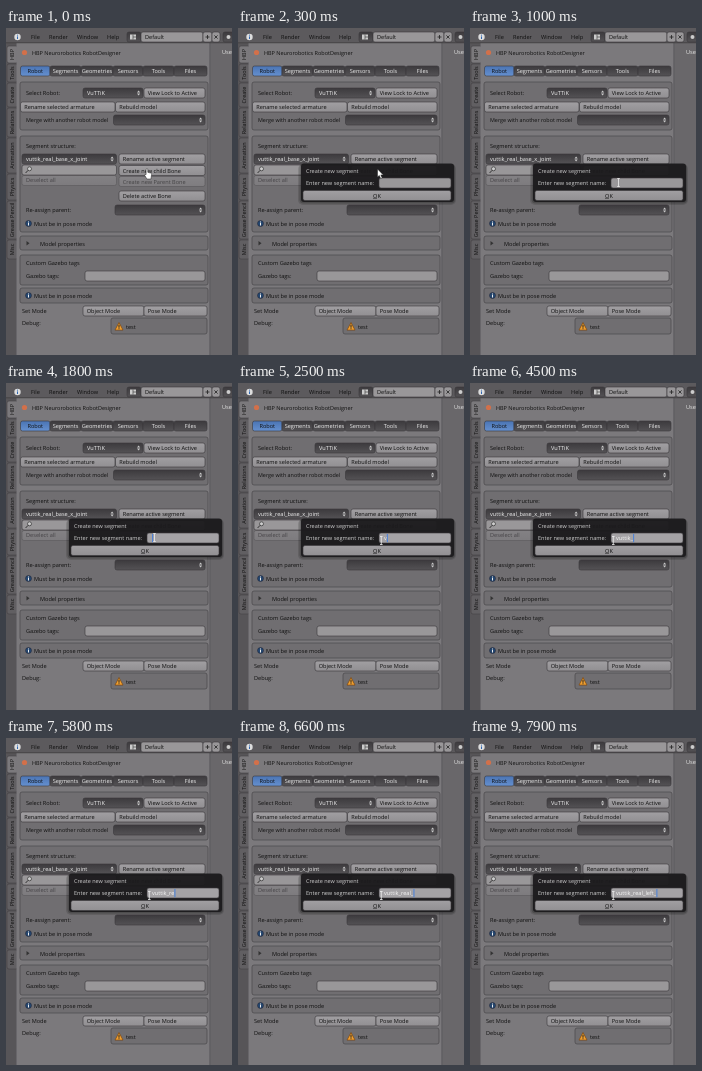
Recreate the animation shown at these times as an HTML page. Size 226 px wide and 327 px high, loop 8 s.

```html
<!DOCTYPE html>
<html lang="en">
<head>
<meta charset="utf-8">
<title>Segment naming</title>
<style>
  html, body { margin: 0; width: 100%; height: 100%; overflow: hidden; background: #7b797c; }
  svg { display: block; width: 100%; height: 100%; }
  text { font-family: "Open Sans", "Noto Sans", sans-serif; text-rendering: geometricPrecision; white-space: pre; }
</style>
</head>
<body>
<svg id="stage" viewBox="0 0 226 327">
  <defs>
    <linearGradient id="button" x2="0" y2="1"><stop stop-color="#a19fa2"/><stop offset="1" stop-color="#918f92"/></linearGradient>
    <linearGradient id="menu" x2="0" y2="1"><stop stop-color="#3c3a3d"/><stop offset="1" stop-color="#545255"/></linearGradient>
    <linearGradient id="active" x2="0" y2="1"><stop stop-color="#4a74b4"/><stop offset="1" stop-color="#6590cf"/></linearGradient>
  </defs>
</svg>
<script>
const LOOP = 8000;
const SIZE = 5.6;
const PANEL = '#7b797c';
const FIELD = '#999799';
const stage = document.getElementById('stage');

function add(tag, attrs, parent = stage) {
  const node = document.createElementNS('http://www.w3.org/2000/svg', tag);
  for (const key in attrs) node.setAttribute(key, attrs[key]);
  return parent.appendChild(node);
}

function rect(x, y, right, bottom, fill, extra, parent) {
  return add('rect', { x, y, width: right - x, height: bottom - y, fill, ...extra }, parent);
}

// y is the vertical middle of the line
function label(text, x, y, extra, parent) {
  const node = add('text', { x, y: y + 2.1, 'font-size': SIZE, fill: '#101010', ...extra }, parent);
  node.textContent = text;
  return node;
}

function widget(x, y, right, fill, extra, parent) {
  return rect(x, y, right, y + 10, fill, { rx: 2, stroke: '#3a383b', 'stroke-width': .6, ...extra }, parent);
}

function button(text, x, y, right, extra) {
  const g = add('g', extra);
  widget(x, y, right, 'url(#button)', {}, g);
  label(text, x + 3.7, y + 5, {}, g);
}

function menu(text, x, y, right) {
  widget(x, y, right, 'url(#menu)');
  label(text, x + 4, y + 5, { fill: '#eee' });
  add('path', { d: `M${right - 6} ${y + 4.4}l1.6-2 1.6 2zm0 1.2l1.6 2 1.6-2z`, fill: '#ccc' });
}

function box(x, y, right, bottom) {
  rect(x, y, right, bottom, '#706e71', { rx: 2, stroke: '#4a484b', 'stroke-width': .7 });
}

function notice(y) {
  add('circle', { cx: 22.5, cy: y, r: 3, fill: '#24466f', stroke: '#223', 'stroke-width': .5 });
  rect(22, y - .5, 23, y + 2, '#eee');
  rect(22, y - 2, 23, y - 1, '#eee');
  label('Must be in pose mode', 28, y);
}

function drawHeader() {
  rect(0, 0, 226, 15, '#5c5a5d');
  rect(0, 14.5, 226, 15.2, '#3a383b');
  add('circle', { cx: 11.5, cy: 9, r: 3.2, fill: '#ddd' });
  rect(11, 8.4, 12, 11, '#2f66b0');
  rect(11, 6.7, 12, 7.6, '#2f66b0');
  [['File', 25], ['Render', 43], ['Window', 71], ['Help', 101]].forEach(([text, x]) => label(text, x, 9));
  widget(121, 4, 135, 'url(#menu)');
  rect(124, 6.5, 130, 11.5, '#ccc');
  add('path', { d: 'M127 6.5v5M127 9h3', stroke: '#444', 'stroke-width': .7 });
  widget(135, 4, 197, FIELD);
  label('Default', 139, 9);
  widget(197, 4, 206, FIELD);
  widget(206, 4, 214, FIELD);
  add('path', { d: 'M199.5 9h4M201.5 7v4M208.4 7.4l3.2 3.2M211.6 7.4l-3.2 3.2', stroke: '#222', 'stroke-width': .8 });
  widget(217, 4, 230, 'url(#menu)');
  add('circle', { cx: 222.5, cy: 9, r: 2, fill: '#ccc' });
}

function drawSideTabs() {
  rect(0, 15, 11, 327, '#575558');
  [['HBP', 18, 35], ['Tools', 36, 54], ['Create', 55, 79], ['Relations', 80, 109], ['Animation', 110, 145],
   ['Physics', 146, 172], ['Grease Pencil', 173, 211], ['Misc', 212, 231]].forEach(([text, top, bottom], i) => {
    rect(1, top, 12, bottom, i ? '#615f62' : PANEL, { rx: 2, stroke: '#434144', 'stroke-width': .6 });
    const middle = (top + bottom) / 2;
    label(text, 5.5, middle, { 'text-anchor': 'middle', 'font-size': 5.5, transform: `rotate(-90 5.5 ${middle})` });
  });
  rect(10.5, 15, 13, 327, PANEL);
}

function drawPanel() {
  add('circle', { cx: 18.5, cy: 24.5, r: 2.6, fill: '#d2704a' });
  label('HBP Neurorobotics RobotDesigner', 26, 24.5, { 'font-size': 5.5 });

  const edges = [14.5, 44, 75, 107, 137, 168, 201];
  ['Robot', 'Segments', 'Geometries', 'Sensors', 'Tools', 'Files'].forEach((text, i) => {
    const [x, right] = [edges[i], edges[i + 1]];
    widget(x, 38, right, i ? 'url(#menu)' : 'url(#active)');
    label(text, (x + right) / 2, 43, { 'text-anchor': 'middle', fill: i ? '#eee' : '#101010' });
  });

  box(14, 54, 202, 102);
  label('Select Robot:', 20, 65);
  menu('VuTTiK', 77, 60, 137);
  button('View Lock to Active', 138, 60, 199);
  button('Rename selected armature', 14.5, 74, 109);
  button('Rebuild model', 109.5, 74, 199);
  label('Merge with another robot model', 20, 92, { 'font-size': 5.4 });
  menu('', 107.5, 87, 199);

  box(14, 108, 202, 204);
  label('Segment structure:', 20, 118);
  menu('vuttik_real_base_x_joint', 16, 126, 110.5);
  widget(16, 137, 110.5, FIELD);
  add('circle', { cx: 23.5, cy: 140.8, r: 2, fill: '#ccc', stroke: '#333', 'stroke-width': .7 });
  add('path', { d: 'M22 142.4l-2.4 2.6', stroke: '#333', 'stroke-width': 1 });
  button('', 16, 147.5, 110.5, { opacity: .4 });
  label('Deselect all', 20, 152, { fill: '#464447' });
  button('Rename active segment', 113, 126, 199);
  button('Create new child Bone', 113, 137.5, 199);
  button('Create new Parent Bone', 113, 148.5, 199, { opacity: .45 });
  button('Delete active Bone', 113, 163, 199);
  label('Re-assign parent:', 20, 182);
  menu('', 109, 177, 199);
  notice(195.5);

  box(14, 208, 202, 222);
  add('path', { d: 'M20.5 213l3 2.2-3 2.2z', fill: '#333' });
  label('Model properties', 34, 215.5);

  box(14, 227, 202, 257);
  label('Custom Gazebo tags', 20, 235);
  label('Gazebo tags:', 20, 248);
  widget(79, 243, 199, FIELD);

  box(14, 260, 202, 275);
  notice(267.5);

  label('Set Mode', 16, 283);
  button('Object Mode', 77, 278, 138);
  button('Pose Mode', 138, 278, 201);
  label('Debug:', 16, 295);
  box(105, 290, 201, 306);
  add('path', { d: 'M113 294.5l4 7.6h-8z', fill: '#f0a030', stroke: '#7a4510', 'stroke-width': .7, 'stroke-linejoin': 'round' });
  rect(112.5, 296.8, 113.5, 299.7, '#222');
  rect(112.5, 300.3, 113.5, 301.2, '#222');
  label('test', 120, 298.5);
}

function drawDialog() {
  const g = add('g');
  rect(60, 136, 218, 177, '#000', { rx: 5, opacity: .13 }, g);
  rect(61.5, 136, 217, 175.5, '#000', { rx: 4, opacity: .2 }, g);
  rect(63, 135.5, 216, 174, '#1b1a1c', { rx: 3, opacity: .93 }, g);
  label('Create new segment', 68, 143, { fill: '#ccc', 'font-size': 5.5 }, g);
  label('Enter new segment name:', 68, 155, { fill: '#ccc' }, g);
  const field = widget(141, 150, 213, FIELD, {}, g);
  widget(65, 162.5, 213, 'url(#button)', {}, g);
  label('OK', 139, 167.5, { 'text-anchor': 'middle' }, g);
  rect(135, 170.2, 139, 170.7, '#222', {}, g);
  return { g, field };
}

rect(0, 0, 226, 327, PANEL);
drawSideTabs();
drawPanel();
rect(204, 15, 226, 327, '#69676a');
rect(203.5, 15, 204.3, 327, '#555356');
label('User', 216, 24, { fill: '#e4e4e4' });
drawHeader();

const dialog = drawDialog();
const typed = label('', 146, 155, { fill: '#f4f4f4' }, dialog.g);
const caret = rect(0, 151, 1.1, 159.2, '#4f83d6', {}, dialog.g);
const outline = { fill: '#fff', stroke: '#222', 'stroke-width': .5 };
const hand = add('path', {
  d: 'M1.6.6q.9-.9 1.7 0v3.2l3 .8q1 .3.8 1.6l-.7 4.3h-4L.2 6.8q-.4-1.2 1.4-.8z', ...outline
});
const arrow = add('path', { d: 'M0 0v8l1.8-1.6 1.4 3.2 1.5-.7-1.4-3h2.5z', ...outline });
const beam = add('path', { d: 'M-1.3 0h2.6M0 0v8M-1.3 8h2.6', stroke: '#eee', 'stroke-width': .8, fill: 'none' });

const NAME = 'vuttik_real_left_';
const KEYS = [2500, 2700, 2900, 3050, 3500, 3700, 4400, 5300, 5800, 6100, 6300, 6600, 7100, 7300, 7500, 7700, 7900];

const show = (node, on) => node.setAttribute('visibility', on ? 'visible' : 'hidden');
const place = (node, x, y) => node.setAttribute('transform', `translate(${x} ${y})`);

place(hand, 138.5, 140.5);
place(arrow, 139.5, 141);

function draw(t) {
  const editing = t >= 1400;
  show(dialog.g, t >= 300);
  dialog.field.setAttribute('fill', editing ? '#a4a2a5' : FIELD);

  typed.textContent = NAME.slice(0, KEYS.filter(time => time <= t).length);
  caret.setAttribute('x', 146 + typed.getComputedTextLength());
  caret.setAttribute('opacity', editing ? 1 : 0);

  show(hand, t < 100);
  show(arrow, t >= 100 && t < 1000);
  show(beam, t >= 1000);
  place(beam, t < 1900 ? 148.5 : 143.3, t < 1900 ? 150.5 : 153.5);
}

const start = performance.now();
function tick() {
  draw((performance.now() - start) % LOOP);
  requestAnimationFrame(tick);
}
tick();
</script>
</body>
</html>
```
